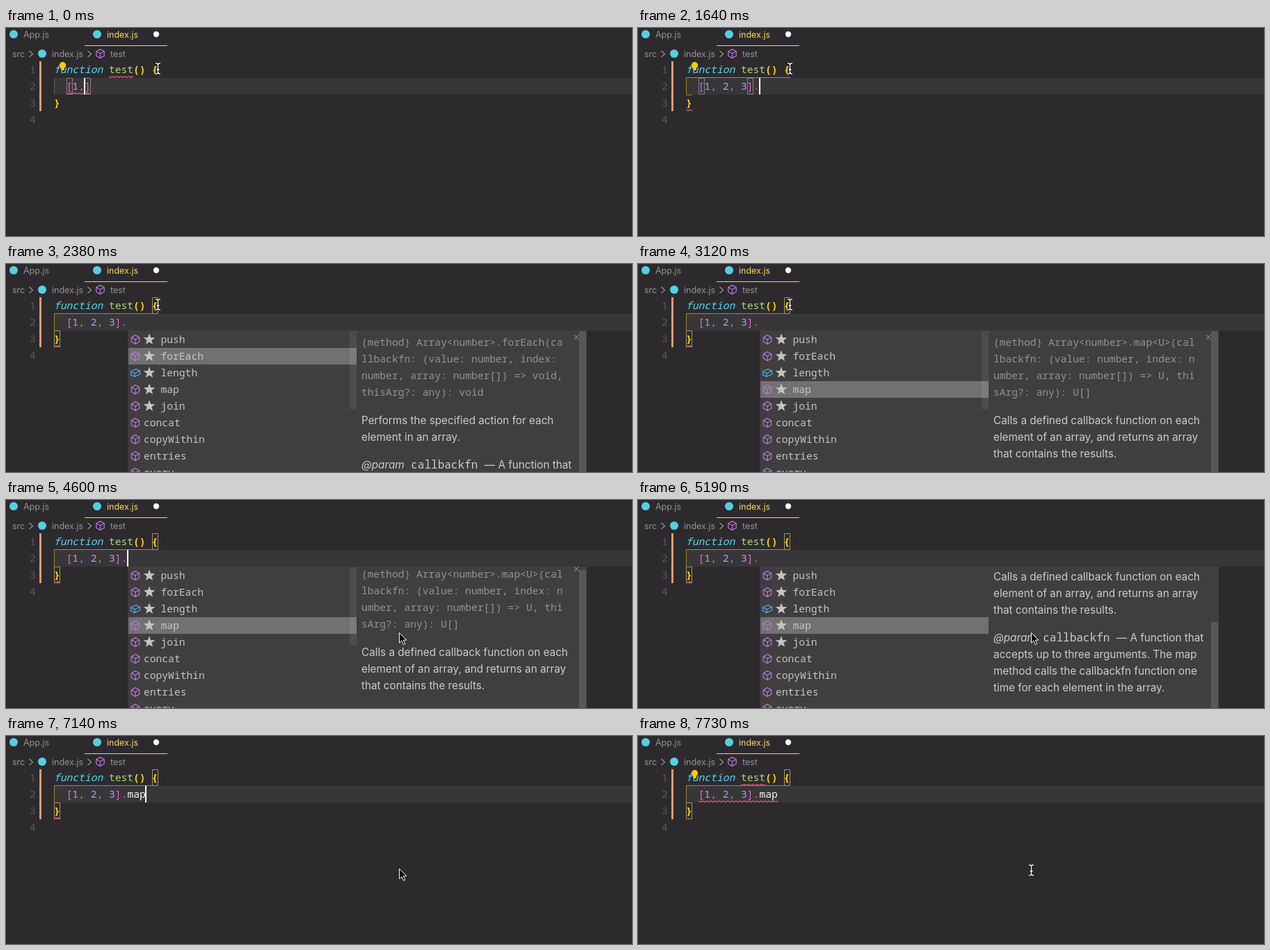
Recreate the animation shown at these times as an HTML page. Size 900 px wide and 300 px high, loop 8 s.

```html
<!DOCTYPE html>
<html lang="en">
<head>
<meta charset="utf-8">
<title>Editor autocomplete</title>
<style>
  html, body { margin: 0; width: 900px; height: 300px; overflow: hidden; background: #2d2a2e; }
  svg { display: block; }
  text { white-space: pre; }
  .ui { font: 12.5px Inter, sans-serif; fill: #939293; }
  .code { font: 14.63px "Noto Sans Mono", monospace; fill: #c5c4c5; }
  .prose { font: 15.26px Inter, sans-serif; fill: #cccbcc; }
  .prose .name { font: 16px "Noto Sans Mono", monospace; }
  .it { font-style: italic; }
  .dim { fill: #939293; }
  .num { fill: #5b595c; }
  .key { fill: #55d9ea; }
  .fn { fill: #a9dc76; }
  .gold { fill: #ffd700; font-weight: 600; }
  .digit { fill: #b59df5; }
  .square { fill: #e068d2; font-weight: 500; }
  .op { fill: #ff6188; }
  .word { fill: #fcfcfa; }
  .line { fill: none; stroke-width: 1.2; stroke-linejoin: round; }
  .violet { stroke: #b778dc; }
  .blue { stroke: #55aee6; }
  .box { fill: none; stroke: #858285; }
</style>
</head>
<body>
<svg width="900" height="300" viewBox="0 0 900 300">
  <defs>
    <path id="cube" class="line" d="M0-6.4 5.7-3.3V3.3L0 6.4-5.7 3.3V-3.3ZM-5.7-3.3 0-.2 5.7-3.3M0-.2V6.4"/>
    <path id="brick" class="line" d="M-6.5-2 1-5.5 6.5-3V2L-1 5.5-6.5 3ZM-6.5-2-1 .8 6.5-3M-1 .8V5.5"/>
    <path id="chevron" class="line" stroke="#939293" d="M-2.5-4.5 2.5 0-2.5 4.5"/>
    <path id="ibeam" d="M-3-7.5Q0-7.5 0-5.5 0-7.5 3-7.5M0-5.5V5.5M-3 7.5Q0 7.5 0 5.5 0 7.5 3 7.5M-1.5 1.5h3"/>
    <pattern id="wave" width="6" height="3" patternUnits="userSpaceOnUse">
      <path d="M-1 3.2 0 2.5 3 .5 6 2.5 7 3.2" fill="none" stroke="#f0587e" stroke-width="1.1"/>
    </pattern>
    <clipPath id="pane"><path d="M504 96H835V300H504Z"/></clipPath>
  </defs>

  <!-- tabs and breadcrumbs -->
  <g fill="#55cfe0">
    <circle cx="11" cy="9" r="6"/><circle cx="131" cy="9" r="6"/><circle cx="52" cy="37" r="6"/>
  </g>
  <g class="ui">
    <text x="25" y="14">App.js</text>
    <text x="145" y="14" style="fill:#ffd850">index.js</text>
    <text x="9" y="42">src</text>
    <text x="66" y="42">index.js</text>
    <text x="150" y="42">test</text>
  </g>
  <circle cx="216" cy="9" r="4.2" fill="#fcfcfa"/>
  <path d="M113 25.5H232" stroke="#ffd850"/>
  <use href="#chevron" x="36" y="37.5"/>
  <use href="#chevron" x="120" y="37.5"/>
  <use href="#cube" class="violet" x="135.5" y="37"/>

  <!-- editor -->
  <path d="M69 72H900V96H69Z" fill="#393639"/>
  <path d="M48 48h3v72h-3z" fill="#fc9867"/>
  <g class="code">
    <text class="num" x="34" y="65">1</text>
    <text class="num" x="34" y="89">2</text>
    <text class="num" x="34" y="113">3</text>
    <text class="num" x="34" y="137">4</text>
    <text x="69" y="65"><tspan class="key it">function</tspan> <tspan class="fn">test</tspan><tspan class="gold">() {</tspan></text>
    <text id="typed" x="69" y="89"></text>
    <text class="gold" x="69" y="113">}</text>
  </g>
  <path data-on="0-1490" d="M69.5 72V96" stroke="#5b595c"/>
  <path data-on="1490-8000" d="M219 71.5H69.5V96.5H78" fill="none" stroke="#a08c1c"/>
  <g data-on="0-1790" class="box">
    <path d="M87.5 72.5h8v23h-8z"/>
    <path id="closer" d="M.5 72.5h8v23h-8z"/>
  </g>
  <g data-on="1790-8000" class="box" style="stroke:#a49858">
    <path d="M210.5 48.5h8v23h-8zM69.5 96.5h8v23h-8z"/>
  </g>
  <g fill="url(#wave)">
    <path data-on="0-1640 7440-8000" d="M148 69h35v3h-35z"/>
    <rect id="wavy" data-on="0-1640 7440-8000" x="87" y="93" height="3"/>
    <path data-on="1640-7440" d="M69 117h9v3h-9z"/>
  </g>
  <g data-on="0-1790 7590-8000" fill="#ffcc00">
    <circle cx="81.5" cy="53.7" r="4.7"/><path d="M79.3 57h4.4v4h-4.4z"/>
  </g>
  <rect id="caret" data-on="0-2240 2680-3120 3720-4160 4600-5190 5640-6090 6690-7730"
        y="72" width="2" height="24" fill="#fcfcfa"/>

  <!-- suggestions -->
  <g data-on="1790-7140">
    <path d="M175.5 96H504V300H175.5Z" fill="#403e41"/>
    <rect id="pick" x="176" width="328" height="24" fill="#727072"/>
    <path data-on="1790-4750" d="M494 97h10v112h-10z" fill="#fff" fill-opacity=".07"/>
    <g id="list"></g>
  </g>
  <g data-on="1940-7140" clip-path="url(#pane)">
    <path d="M504 96H835V300H504Z" fill="#403e41"/>
    <g id="docs"><path d="M816.5 102l7 7m0-7l-7 7" stroke="#a5a3a5"/></g>
    <rect id="slider" x="824" width="10" height="215" fill="#595759"/>
  </g>

  <!-- pointers -->
  <g id="beam" fill="none" stroke-linecap="round">
    <use href="#ibeam" stroke="#1b191b" stroke-width="3"/>
    <use href="#ibeam" stroke="#fff" stroke-width="1.3"/>
  </g>
  <path id="arrow" d="M0 0V14.5L3.4 11.4 5.8 17 8.2 16 5.8 10.5H10.3Z" fill="#000" stroke="#fff"/>
</svg>
<script>
const LOOP = 8000, CELL = 8.78, LEFT = 69;
const $ = id => document.getElementById(id);
const colX = col => LEFT + col * CELL;
const esc = s => s.replace(/</g, '&lt;');

// Each row: start time, then the values that hold from there on.
const typing = [
  [0, '[1,]', 5], [300, '[1, ]', 6], [440, '[1, 2]', 7], [740, '[1, 2,]', 8],
  [890, '[1, 2, ]', 9], [1040, '[1, 2, 3]', 10], [1490, '[1, 2, 3]', 11],
  [1640, '[1, 2, 3].', 12], [7140, '[1, 2, 3].map', 15]
];
const picks = [[0, 0], [2380, 1], [2530, 2], [2680, 3]];
const scrolls = [[0, 0], [4600, 6], [4750, 25], [4900, 55], [5050, 90], [5190, 115], [5340, 130]];
const pointer = [
  [0, 218.5, 58.5, 'beam'], [4010, 250, 84, 'beam'], [4160, 372, 130, 'arrow'],
  [4300, 505, 174, 'arrow'], [4450, 565.5, 191.5, 'arrow'], [7290, 565.5, 193.5, 'beam']
];
const at = (rows, t) => rows.filter(r => r[0] <= t).pop();

const items = ['push', 'forEach', 'length', 'map', 'join', 'concat', 'copyWithin', 'entries', 'every'];
const details = [
  { code: ['(method) Array<number>.push(...it', 'ems: number[]): number'],
    text: ['Appends new elements to the end of an', 'array, and returns the new length of the', 'array.'],
    params: [['items', 'New elements to add to', 'the array.']] },
  { code: ['(method) Array<number>.forEach(ca', 'llbackfn: (value: number, index: ',
           'number, array: number[]) => void,', 'thisArg?: any): void'],
    text: ['Performs the specified action for each', 'element in an array.'],
    params: [['callbackfn', 'A function that']] },
  { code: ['(property) Array<number>.length: ', 'number'],
    text: ['Gets or sets the length of the array. This', 'is a number one higher than the highest', 'index in the array.'],
    params: [] },
  { code: ['(method) Array<number>.map<U>(cal', 'lbackfn: (value: number, index: n',
           'umber, array: number[]) => U, thi', 'sArg?: any): U[]'],
    text: ['Calls a defined callback function on each', 'element of an array, and returns an array', 'that contains the results.'],
    params: [
      ['callbackfn', 'A function that', 'accepts up to three arguments. The map',
       'method calls the callbackfn function one', 'time for each element in the array.'],
      ['thisArg', 'An object to which']
    ] }
];

function star(x, y) {
  const pts = Array.from({ length: 10 }, (_, i) => {
    const r = i % 2 ? 3.6 : 8.7, a = (i / 5 - .5) * Math.PI;
    return [x + r * Math.cos(a), y + r * Math.sin(a)].map(v => v.toFixed(1));
  });
  return `<polygon points="${pts.join(' ')}" fill="#c5c4c5"/>`;
}

$('list').innerHTML = items.map((name, i) => {
  const y = 109 + 24 * i, starred = i < 5, prop = name === 'length';
  return `<use href="#${prop ? 'brick' : 'cube'}" class="${prop ? 'blue' : 'violet'}" x="186" y="${y}"/>` +
    (starred ? star(206, y) : '') +
    `<text class="code" x="${starred ? 222.5 : 198}" y="${y + 5}">${name}</text>`;
}).join('');

function detailMarkup({ code, text, params }) {
  let y = 118;
  const row = (cls, s) => {
    const out = `<text class="${cls}" x="511" y="${y}">${s}</text>`;
    y += 24;
    return out;
  };
  let out = code.map(s => row('code dim', esc(s))).join('');
  y += 16.5;
  out += text.map(s => row('prose', s)).join('');
  for (const [name, first, ...rest] of params) {
    y += 16;
    out += row('prose', `<tspan class="it">@param</tspan><tspan class="name"> ${name} </tspan>— ${first}`);
    out += rest.map(s => row('prose', s)).join('');
  }
  return `<g class="detail">${out}</g>`;
}
$('docs').insertAdjacentHTML('beforeend', details.map(detailMarkup).join(''));

const kind = c => /\d/.test(c) ? 'digit' : /[[\]]/.test(c) ? 'square' : c === '.' ? 'op' : c === ',' ? 'dim' : 'word';
const paint = s => '  ' + [...s].map(c => `<tspan class="${kind(c)}">${c}</tspan>`).join('');

const timed = [...document.querySelectorAll('[data-on]')].map(el => ({
  el, spans: el.dataset.on.split(' ').map(s => s.split('-').map(Number))
}));
const pages = [...document.querySelectorAll('.detail')];
const show = (el, on) => { el.style.display = on ? '' : 'none'; };
let shown = '';

function draw(t) {
  for (const { el, spans } of timed) show(el, spans.some(([a, b]) => t >= a && t < b));

  const [, text, col] = at(typing, t);
  if (text !== shown) $('typed').innerHTML = paint(shown = text);
  $('caret').setAttribute('x', Math.round(colX(col) - .6));
  $('closer').setAttribute('transform', `translate(${Math.round(colX(2 + text.indexOf(']')))})`);
  $('wavy').setAttribute('width', text.length * CELL);

  const pick = at(picks, t)[1], scroll = at(scrolls, t)[1];
  $('pick').setAttribute('y', 97 + 24 * pick);
  pages.forEach((p, i) => show(p, i === pick));
  $('docs').setAttribute('transform', `translate(0 ${-scroll})`);
  $('slider').setAttribute('y', 97 + .69 * scroll);

  const [, x, y, shape] = at(pointer, t);
  for (const id of ['beam', 'arrow']) {
    show($(id), id === shape);
    $(id).setAttribute('transform', `translate(${x} ${y})`);
  }
}

const start = performance.now();
function tick() {
  draw((performance.now() - start) % LOOP);
  requestAnimationFrame(tick);
}
tick();
</script>
</body>
</html>
```
